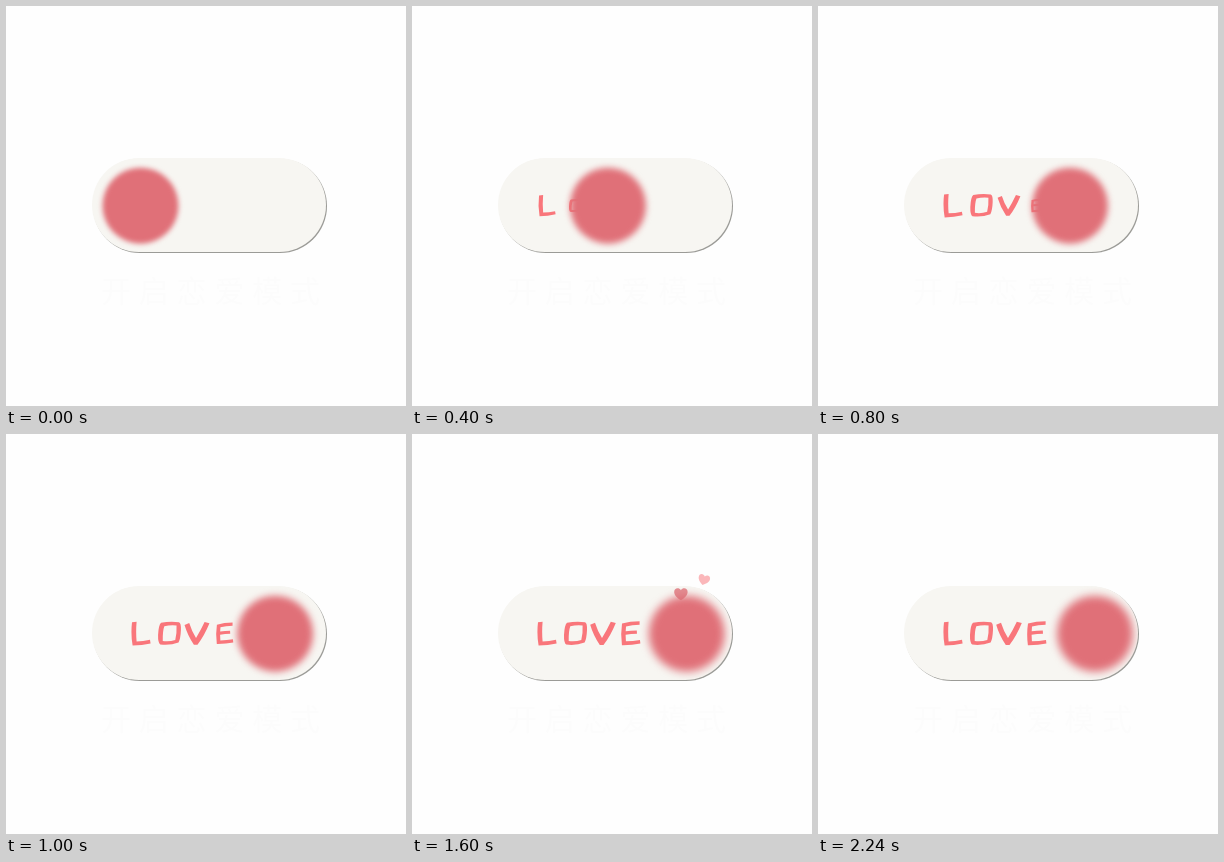
An HTML page for the animation above (2.52 s loop, 400 px wide and 400 px high).

```html
<!DOCTYPE html>
<html lang="zh">
<head>
<meta charset="utf-8">
<title>Love switch</title>
<style>
  html, body { margin: 0; width: 100%; height: 100%; overflow: hidden; background: #fefefe; }
  svg { display: block; width: 100vw; height: 100vh; }
  #word { fill: #f9767b; fill-rule: evenodd; }
  text { font: 30px "Noto Sans CJK SC", "Noto Sans CJK", sans-serif; letter-spacing: 7.8px; fill: #fcfcfc; }
</style>
</head>
<body>
<svg viewBox="0 0 400 400" role="img" aria-label="LOVE">
  <defs>
    <clipPath id="clip"><rect x="86" y="152" width="234" height="94" rx="47"/></clipPath>
    <filter id="soft" x="-50%" y="-50%" width="200%" height="200%" color-interpolation-filters="sRGB">
      <feGaussianBlur id="blur"/>
    </filter>
  </defs>
  <rect x="87" y="153" width="234" height="94" rx="47" fill="#9b9b97"/>
  <rect x="86" y="152" width="234" height="94" rx="47" fill="#f7f6f2"/>
  <text x="95" y="296">开启恋爱模式</text>
  <g id="word">
    <path d="M126 188.3L130.6 187.8Q129.7 198 130.6 207.4Q137 207.3 144 205.8L144.6 209.4Q136 211.5 126.6 211.6Q124.6 200 126 188.3Z"/>
    <path d="M155 188.8Q164 187 173 188.2Q175.3 189 175 196Q174.6 205 172.6 208.6Q164 211.8 154.2 210.6Q151.8 209 152 201Q152.5 191 155 188.8ZM158.3 192.2Q156.5 197 156.7 207Q163 208 169.3 206Q171 199 170.6 191.4Q164 190.8 158.3 192.2Z"/>
    <path d="M178.2 190.8L183 188.8Q185.5 197 190 204Q194.5 197 198.8 187.8L203.8 189Q198.5 202 191.5 211L187.8 211Q181.5 202 178.2 190.8Z"/>
    <path d="M210 189.6Q218 187.2 227.6 187.2L227.6 190.8Q220 191 214 192.4L213.7 197.2Q219 196.4 224.8 196.4L225 199.8Q219 199.8 213.6 200.8L213.9 207.2Q221 207.2 228 206L228.4 209.6Q220 211.3 209.9 211.2Q208.4 200 210 189.6Z"/>
  </g>
  <g clip-path="url(#clip)"><circle id="knob" cy="199.7" r="38" fill="#e07078" filter="url(#soft)"/></g>
  <g id="hearts">
    <path fill="#dc6a73"/>
    <path fill="#f98f93"/>
  </g>
</svg>
<script>
const LOOP = 2520, STEP = 40, LAST = 2240;
const knob = document.getElementById('knob');
const blur = document.getElementById('blur');
const letters = [...document.querySelectorAll('#word path')];
const hearts = [...document.querySelectorAll('#hearts path')];
const centers = [135.5, 163.5, 191, 218.2];
const track = [[0, 134.5], [160, 158], [400, 196], [560, 221], [800, 252],
               [1120, 277], [1280, 280], [1600, 274.8], [1900, 276.2], [2240, 277]];
const flights = [
  { start: 1400, span: 840, y: 186, dx: -34, size: 1.05, tilt: 0 },
  { start: 1280, span: 900, y: 182, dx: 42, size: .9, tilt: 15 }
];
const clamp = v => Math.max(0, Math.min(1, v));

hearts.forEach(h => h.setAttribute('d', 'M0 6C-3 4-6.4 1.5-6.4-2C-6.4-6-1.8-6.6 0-3.6C1.8-6.6 6.4-6 6.4-2C6.4 1.5 3 4 0 6Z'));

function slope(i) {
  const a = track[Math.max(0, i - 1)], b = track[Math.min(track.length - 1, i + 1)];
  return (b[1] - a[1]) / (b[0] - a[0]);
}

// Smooth curve through the track points.
function knobX(t) {
  let i = 0;
  while (i < track.length - 2 && t > track[i + 1][0]) i++;
  const [t0, x0] = track[i], [t1, x1] = track[i + 1];
  const d = t1 - t0, u = (t - t0) / d, v = 1 - u;
  return x0 * v * v * (1 + 2 * u) + x1 * u * u * (3 - 2 * u)
       + d * u * v * (slope(i) * v - slope(i + 1) * u);
}

function draw(t) {
  knob.setAttribute('cx', knobX(t));
  blur.setAttribute('stdDeviation', 2.5 + 1.5 * clamp(t / 1280));
  letters.forEach((letter, i) => {
    const p = clamp((t - 80 - 200 * i) / 1000);
    const s = p === 1 ? 1 : 1 - 2 ** (-10 * p);
    letter.setAttribute('transform',
      `translate(${centers[i]} 199.7) scale(${s}) translate(${-centers[i]} -199.7)`);
    letter.style.visibility = s > 0 ? 'visible' : 'hidden';
  });
  hearts.forEach((heart, i) => {
    const f = flights[i], p = clamp((t - f.start) / f.span);
    const x = 277 + f.dx * p, y = f.y - 62 * (1 - (1 - p) ** 2);
    heart.setAttribute('transform',
      `translate(${x} ${y}) rotate(${f.tilt}) scale(${f.size * clamp(p * 4.5)})`);
    heart.setAttribute('opacity', p > 0 ? 1 - p : 0);
  });
}

const origin = performance.now();
function tick() {
  const t = (performance.now() - origin) % LOOP;
  draw(Math.min(LAST, Math.floor(t / STEP) * STEP));
  requestAnimationFrame(tick);
}
tick();
</script>
</body>
</html>
```
